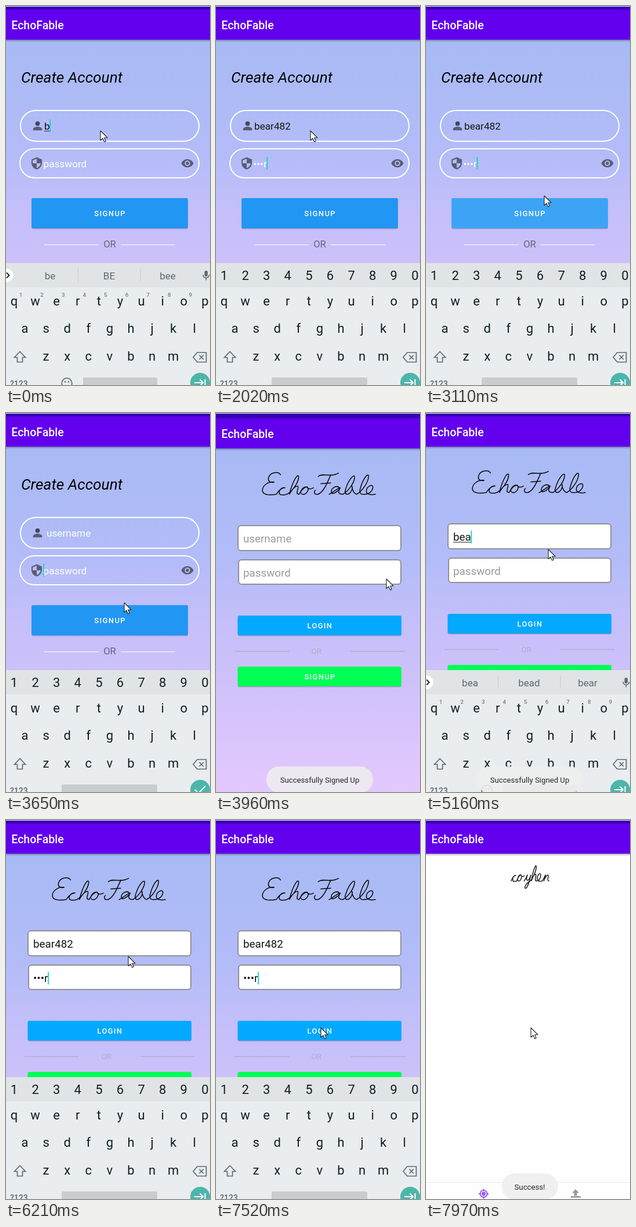
These frames come from a looping animation (352 by 653 pixels, 8 s). An HTML page:

```html
<!DOCTYPE html>
<html lang="en">
<head>
<meta charset="utf-8">
<title>EchoFable</title>
<style>
  html, body { margin: 0; width: 100%; height: 100%; overflow: hidden; background: #fefefe; }
  svg { display: block; width: 352px; height: 653px; font-family: Roboto, sans-serif; }
  text { white-space: pre; }
</style>
</head>
<body>
<svg id="stage" viewBox="0 0 352 653" xmlns="http://www.w3.org/2000/svg"></svg>
<script>
const LOOP = 8000, STEP = 140;
const INK = '#101e26', GREY = '#5d6a71';

// ---- drawing helpers ----
const rect = (x, y, w, h, fill, more = '') =>
  `<rect x="${x}" y="${y}" width="${w}" height="${h}" fill="${fill}" ${more}/>`;
const text = (x, y, size, fill, str, more = '') =>
  `<text x="${x}" y="${y}" font-size="${size}" fill="${fill}" ${more}>${str}</text>`;
const mid = (x, y, size, fill, str, more = '') =>
  text(x, y, size, fill, str, 'text-anchor="middle" ' + more);
const line = (d, color, width = 1, more = '') =>
  `<path d="${d}" fill="none" stroke="${color}" stroke-width="${width}" ${more}/>`;
const shape = (d, fill, more = '') => `<path d="${d}" fill="${fill}" ${more}/>`;
const group = (id, body, more = '') => `<g id="${id}" ${more}>${body}</g>`;
const button = (x, y, w, h, fill, label, size) =>
  rect(x, y + 1.5, w, h, '#203', 'rx="3" opacity=".22"') + rect(x, y, w, h, fill, 'rx="3"') +
  mid(x + w / 2 + .7, y + h / 2 + size * .36, size, '#fff', label, 'font-weight="500" letter-spacing="1.4"');

// Joined handwriting: each letter starts and ends on the baseline.
const pen = {
  E: 'm18-24c-4-5-14-3-14 4c0 5 5 6 8 5c-8-1-14 5-12 11c2 6 13 5 18 4',
  F: 'm2-22c6-5 14 2 24-4m-9 2c-2 8-4 22-11 24c-4 1-6-3-4-5m5-8l12-1m1 14',
  a: 'c3-1 6-5 11-8c-5-4-10 1-9 5c1 5 8 0 10-5c-2 5-1 8 5 8',
  b: 'c6-4 11-14 10-21c-1-5-7 2-8 15c-1 8 7 8 8 0c0-2 0-3-1-4c1 4 4 9 8 10',
  c: 'c1-3 4-8 9-8c-4-1-7 3-6 6c1 4 7 3 10 2',
  e: 'c6 0 9-5 8-9c-1-4-8-1-7 5c1 5 8 5 12 4',
  h: 'c6-4 11-14 10-21c-1-5-6 0-7 21c2-6 5-10 8-10c3 1-2 10 4 10',
  l: 'c6-4 11-14 10-22c-1-5-6 1-7 14c-1 6 2 9 7 8',
  n: 'c2-1 4-5 6-9c1 3-1 6-2 9c2-5 5-9 8-9c3 1-2 9 4 9',
  o: 'c1-4 4-9 8-9c-6-1-9 8-4 9c5 1 8-6 4-9c2 3 5 3 8 1m1 8',
  y: 'c2-1 4-5 6-9c-2 5-1 8 2 8c3 0 5-4 6-8c-1 8-4 20-8 20c-5 0 0-8 8-11'
};
const script = (word, x, y, sx, sy, color) =>
  `<g transform="translate(${x} ${y}) scale(${sx} ${sy}) skewX(-12)">` +
  line('M0 0' + [...word].map(c => pen[c]).join(''), color, 1.5,
    'vector-effect="non-scaling-stroke" stroke-linecap="round" stroke-linejoin="round"') + '</g>';

// ---- text fields whose content changes ----
const field = id => group(id,
  text(0, 0, 10, '#000', '') + line('M0 0', '#222', 1) + rect(0, 0, 1.8, 22, '#10d8c4'));

function setField(id, o) {
  const [label, under, caret] = $(id).children;
  const empty = !o.str;
  label.textContent = o.str || o.hint;
  label.setAttribute('x', empty ? o.hintX || o.x : o.x);
  label.setAttribute('y', o.y);
  label.setAttribute('font-size', o.size);
  label.setAttribute('fill', empty ? o.hintFill : o.fill);
  const end = o.x + (empty ? 0 : label.getComputedTextLength());
  under.setAttribute('d', o.under && !empty ? `M${o.x} ${o.y + 2.5}H${end}` : '');
  caret.setAttribute('x', end - .3);
  caret.setAttribute('y', o.y - 17.5);
  caret.setAttribute('visibility', o.focus ? 'inherit' : 'hidden');
}

// ---- pages ----
const bar = rect(0, -10, 352, 16, '#3700b3') + rect(0, 6, 352, 52, '#6200ee') +
  rect(0, 58, 352, 4, 'url(#shade)') +
  text(9.3, 39.6, 19.5, '#fff', 'EchoFable', 'font-weight="500"');

const signup =
  text(26, 132, 26.3, '#000', 'Create Account', 'font-style="italic"') +
  rect(25, 180, 308, 53, 'none', 'rx="26.5" stroke="#fff" stroke-width="2"') +
  rect(24, 246, 309, 50, 'none', 'rx="25" stroke="#fff" stroke-width="2"') +
  '<g opacity=".62"><circle cx="54.5" cy="202.6" r="3.9"/>' +
  shape('M46.7 214.3v-2.2c0-2.6 5.2-4 7.8-4s7.8 1.4 7.8 4v2.2z', '#222') +
  shape('M53 260.6l-9 4v5.8c0 5.2 3.8 9.8 9 11.2c5.2-1.4 9-6 9-11.2v-5.8z' +
    'M53 263v8h-7v-5zM53 271h6.8c-.5 3.8-3.2 7-6.8 8.3z', '#222', 'fill-rule="evenodd"') +
  shape('M302.5 271c1.7-4.3 5.8-7 10.5-7s8.8 2.7 10.5 7c-1.7 4.3-5.8 7-10.5 7s-8.8-2.7-10.5-7z' +
    'M313 266.3a4.7 4.7 0 1 0 .01 0zM313 268.2a2.8 2.8 0 1 1-.01 0z', '#222') + '</g>' +
  field('sName') + field('sPass') +
  button(44, 331, 270, 52, '#2196f3', 'SIGNUP', 13) +
  rect(44, 331, 270, 52, '#fff', 'id="press" rx="3"') +
  line('M66 411.5H160M198 411.5H292', '#fff') +
  mid(179, 416, 16.6, '#65647c', 'OR');

const box = (x, y, h) => rect(x, y, 319 - x, h, '#fff', 'rx="5" stroke="#929196" stroke-width="2"');
const login = script('EchoFable', 79, 137, 1.4, 1.4, '#080808') +
  box(38, 191, 43) + box(39, 250, 42) + field('lName') + field('lPass') +
  button(37.5, 346, 282.5, 34, '#03a9ff', 'LOGIN', 12.8) +
  line('M32 407.5H126M232 407.5H326', '#b3adc9', 1.3) +
  mid(173, 412, 13.6, '#b3adc9', 'OR') +
  button(37.5, 434, 282.5, 34, '#00ff55', 'SIGNUP', 12.8);

const home = rect(0, 50, 352, 620, '#fefefe') + script('coyhen', 147, 105, .74, 1.15, '#222') +
  line('M0 624.5H352', '#e8e8e8') +
  '<circle cx="99.5" cy="644" r="6" fill="none" stroke="#9a5cf0" stroke-width="2"/>' +
  '<circle cx="99.5" cy="644" r="3.4" fill="#9a5cf0"/>' +
  line('M99.5 635.5v4M99.5 648.5v4M91 644h4M104 644h4', '#9a5cf0', 2) +
  shape('M258 636l6 6.5h-3.5v5h-5v-5h-3.5zM250 648h17v2.8h-17z', '#9a9a9a');

// ---- keyboard ----
const keys = (row, x0, y) => [...row].map((c, i) => mid(x0 + i * 36.6, y, 22, INK, c)).join('');
const wide = group('words',
  '<circle cx="1" cy="464" r="11.5" fill="#fff"/>' + line('M1 459.5l4.5 4.5l-4.5 4.5', INK, 1.8) +
  [76, 178, 279].map(x => mid(x, 470.5, 17, GREY, '')).join('') +
  line('M124.5 452V475M232 452V475', '#c3c9cc') +
  rect(342.5, 456, 5.5, 10, GREY, 'rx="2.7"') + line('M340 463c0 7 10.5 7 10.5 0M345.2 468.5v4', GREY, 1.6) +
  [...'123456789'].map((c, i) => mid(25.5 + i * 36.6, 501, 9.8, '#737e84', c, 'font-weight="500"')).join('') +
  '<circle cx="105" cy="650" r="8.8" fill="none" stroke="#5d6a71" stroke-width="1.7"/>' +
  '<circle cx="102" cy="647.5" r="1.3" fill="#5d6a71"/><circle cx="108" cy="647.5" r="1.3" fill="#5d6a71"/>' +
  rect(133, 640, 128, 20, '#c9cdd0', 'rx="2"'));
const digits = group('digits', keys('1234567890', 14, 472) + rect(96, 640, 165, 20, '#c9cdd0', 'rx="2"'));
const keyboard = rect(0, 443, 352, 210, '#e9edf0') + rect(0, 443, 352, 42, '#e0e4e6') +
  wide + digits +
  keys('qwertyuiop', 14, 516) + keys('asdfghjkl', 32.5, 563) + keys('zxcvbnm', 69, 611) +
  line('M24 595.5l9.5 10h-5v8h-9v-8h-5z', GREY, 1.7) +
  line('M330 597h15.5v16.5h-15.5l-7-8.2zM333.5 601.5l7.5 7.5M341 601.5l-7.5 7.5', GREY, 1.7) +
  text(7, 656, 14, GREY, '?123', 'font-weight="500"') +
  '<circle cx="335" cy="649" r="17" fill="#4db6ac"/>' +
  line('', '#fff', 2, 'id="enter"');

const ARROW = 'M325 649H340M334.5 643.5l5.5 5.5l-5.5 5.5M343.5 643V655';
const CHECK = 'M326 649l6 6l12-12';

document.getElementById('stage').innerHTML =
  `<defs><linearGradient id="sky" x1="0" y1="0" x2="0" y2="1">
    <stop offset="0" stop-color="#a7baf4"/><stop offset=".33" stop-color="#b3bcf8"/>
    <stop offset=".5" stop-color="#c4bffa"/><stop offset=".65" stop-color="#cdc1fa"/>
    <stop offset="1" stop-color="#e4c9ff"/></linearGradient>
  <linearGradient id="shade" x1="0" y1="0" x2="0" y2="1">
    <stop offset="0" stop-opacity=".32"/><stop offset="1" stop-opacity="0"/></linearGradient></defs>` +
  group('page', rect(0, 55, 352, 600, 'url(#sky)') +
    group('signup', signup) + group('login', login) + group('home', home) + bar) +
  rect(0, 0, 352, 1, '#f4f4f4') +
  group('keyboard', keyboard) +
  group('toast', rect(0, 609, 0, 45, '#eee', 'rx="22" opacity=".88"') + mid(179, 637, 13.2, '#282828', '')) +
  group('mouse', shape('M0 0V16.5L3.9 13L6.6 19L9.2 17.8L6.6 12H12Z', '#fff',
    'stroke="#222" stroke-width="1.1" stroke-linejoin="round"'));

const $ = id => document.getElementById(id);
const show = (id, on) => $(id).setAttribute('visibility', on ? 'visible' : 'hidden');

// ---- timeline: [time, value] pairs hold until the next one ----
const at = (track, t) => track.reduce((v, [time, next]) => t >= time ? next : v, track[0][1]);
const USER = 'bear482';
const typed = (...pairs) => pairs.map(([t, n]) => [t, USER.slice(0, n)]);
const tracks = {
  page: [[0, 'signup'], [3800, 'login'], [7670, 'home']],
  shift: [[0, 0], [3800, 3], [4590, 0], [7670, 3], [7970, 0]],
  name: typed([0, 1], [150, 2], [270, 4], [890, 5], [1040, 6], [1160, 7], [3530, 0],
    [4880, 1], [5010, 2], [5160, 3], [5280, 4], [5430, 5], [5580, 6], [5700, 7]),
  pass: [[0, ''], [1750, 'b'], [1890, '••a'], [2020, '•••r'], [3380, '••••'], [3530, ''],
    [5950, 'b'], [6080, '••a'], [6210, '•••r']],
  focus: [[0, 'name'], [1470, 'pass'], [3800, ''], [4440, 'name'], [5820, 'pass']],
  drop: [[0, 0], [3800, 210], [4440, 90], [4590, 0], [7670, 210]],
  press: [[0, 0], [3110, .12], [3240, .22], [3380, .1], [3530, 0]],
  toast: [[0, 0], [3800, .5], [3960, 1], [5700, .5], [5820, 0], [7820, .5], [7970, 1]],
  enter: [[0, ARROW], [3530, CHECK], [3800, ARROW]]
};
const guesses = {
  b: ['be', 'BE', 'bee'], be: ['be', 'bed', 'bee'],
  bea: ['bea', 'bead', 'bear'], bear: ['bear', 'beard', 'bears']
};
const stops = [[0, 0, 163, 215], [2430, 2990, 204, 327], [3650, 3960, 294, 286],
  [3960, 4440, 211, 235], [6630, 7370, 181, 358]];

function pointer(t) {
  let [, , x, y] = stops[0];
  for (const [from, to, nx, ny] of stops.slice(1)) {
    if (t < from) break;
    const k = t >= to ? 1 : Math.floor((t - from) / STEP) * STEP / (to - from);
    x += (nx - x) * k;
    y += (ny - y) * k;
  }
  return `translate(${x} ${y})`;
}

function draw(t) {
  const s = {};
  for (const key in tracks) s[key] = at(tracks[key], t);

  for (const id of ['signup', 'login', 'home']) $(id).setAttribute('display', s.page === id ? 'inline' : 'none');
  $('page').setAttribute('transform', `translate(0 ${s.shift})`);
  $('press').setAttribute('opacity', s.press);

  const onName = s.focus === 'name', onPass = s.focus === 'pass';
  const name = { str: s.name, hint: 'username', focus: onName, under: onName };
  const pass = { str: s.pass, hint: 'password', focus: onPass };
  if (s.page === 'signup') {
    const look = { size: 17.2, hintFill: '#fff' };
    setField('sName', { ...name, ...look, x: 66, hintX: 70, y: 213, fill: '#151515' });
    setField('sPass', { ...pass, ...look, x: 64.5, y: 277.5, fill: '#fff' });
  } else if (s.page === 'login') {
    const look = { size: 18.8, x: 47, fill: '#151515', hintFill: '#9a9a9a' };
    setField('lName', { ...name, ...look, y: 220 });
    setField('lPass', { ...pass, ...look, y: 279 });
  }

  show('keyboard', s.drop < 210);
  $('keyboard').setAttribute('transform', `translate(0 ${s.drop})`);
  $('words').setAttribute('display', onPass ? 'none' : 'inline');
  $('digits').setAttribute('display', onPass ? 'inline' : 'none');
  const hints = guesses[s.name] || ['', s.name, ''];
  $('words').querySelectorAll('text').forEach((el, i) => { if (i < 3) el.textContent = hints[i]; });
  $('enter').setAttribute('d', s.enter);

  const [pill, note] = $('toast').children;
  const width = s.page === 'home' ? 97 : 184;
  pill.setAttribute('x', 179 - width / 2);
  pill.setAttribute('width', width);
  note.textContent = s.page === 'home' ? 'Success!' : 'Successfully Signed Up';
  $('toast').setAttribute('opacity', s.toast);

  $('mouse').setAttribute('transform', pointer(t));
}

const start = performance.now();
function tick() {
  draw((performance.now() - start) % LOOP);
  requestAnimationFrame(tick);
}
tick();
</script>
</body>
</html>
```
